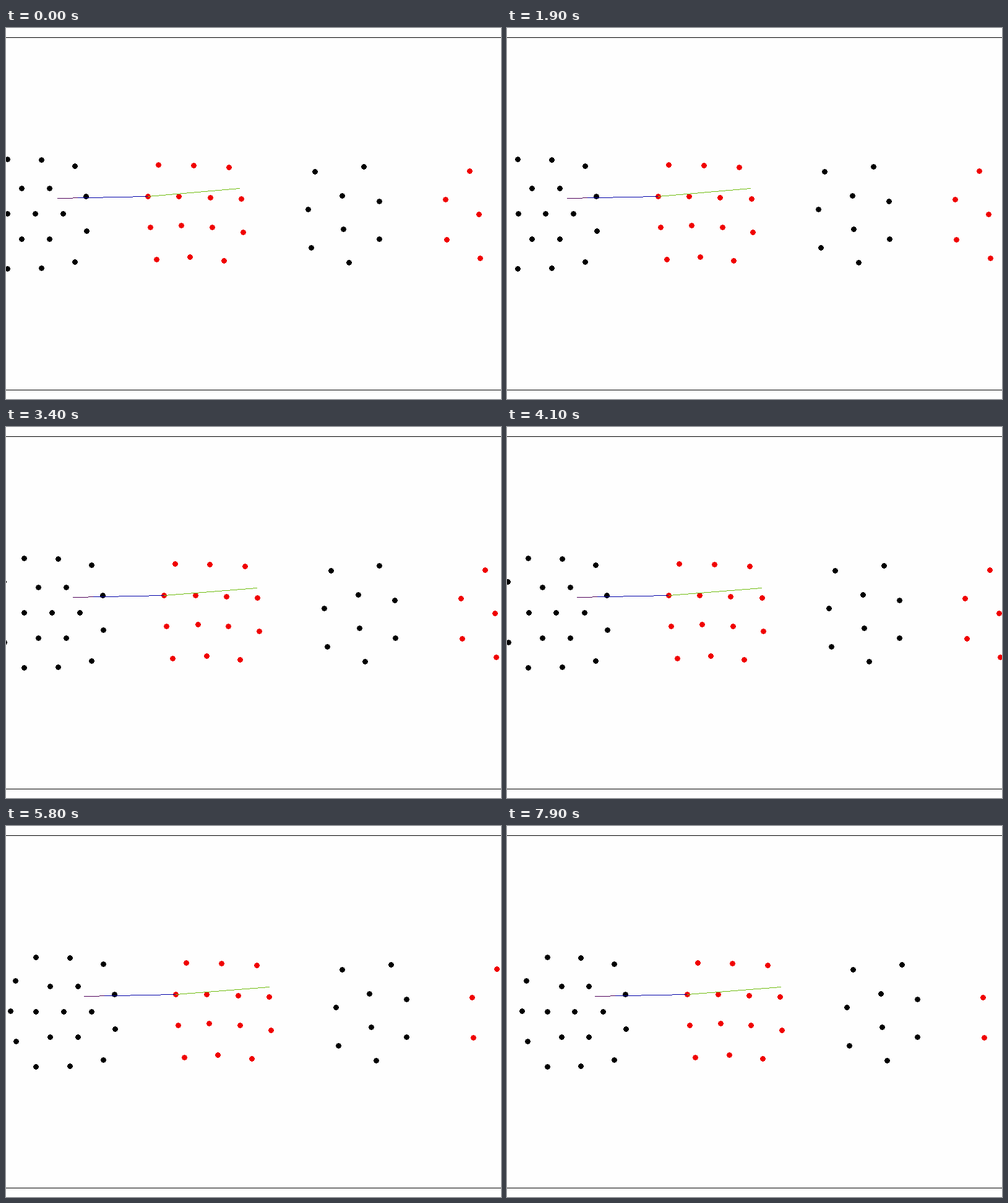
A matplotlib script that plays this animation: 800x600 px, repeating every 8000 ms.

```python
import numpy as np
import matplotlib.pyplot as plt
from matplotlib.animation import FuncAnimation
from matplotlib.collections import PolyCollection

W, H, DPI = 800, 600, 100
FRAMES, STEP_MS = 80, 100
AXIS_Y = 300.8
PURPLE_LEN = 33


def arc(a, b, n, bow=0):
    """n points spread from a to b, bent sideways by bow pixels."""
    a, b = np.array(a), np.array(b)
    s = np.linspace(0, 1, n)[:, None]
    side = np.array([a[1] - b[1], b[0] - a[0]]) / np.hypot(*(b - a))
    return a + (b - a) * s + side * bow * 4 * s * (1 - s)


def ring(cx, cy, rx, ry, n):
    q = 2 * np.pi * np.arange(n) / n
    return np.column_stack([cx + rx * np.cos(q), cy + ry * np.sin(q)])


def mirror(points):
    return points * [1, -1] + [0, 2 * AXIS_Y]


top = arc((2.3, 212.5), (111.5, 223.5), 3, -4.5)
black = np.vstack([
    # Round cluster: centre, hexagon and outer rim
    [(47.3, AXIS_Y)],
    ring(47.9, AXIS_Y, 45, 47.3, 6),
    top, mirror(top),
    arc((-31, 250.5), (-29.8, 348.5), 3, 8.3),
    arc((129.6, 272.5), (130.6, 328.2), 2),
    # Loose cluster of three bent columns
    arc((499.2, 232.5), (493.4, 355.5), 3, 7.4),
    arc((543.7, 271.3), (554.2, 379.5), 3, 3),
    arc((578.1, 224.5), (603.7, 341.7), 3, -12.5),
])
grid = arc((229.4, 272.5), (380.4, 276.6), 4, -1)
red = np.vstack([
    # Square cluster of four rows
    arc((246.5, 221.5), (360.4, 225.5), 3, -1),
    grid,
    arc((233.4, 322.5), (383.2, 330), 4, -6),
    arc((243.2, 374.5), (352.2, 376.8), 3, -5),
    # Cluster at the right edge
    arc((710, 277.2), (712.2, 342.7), 2),
    arc((749.4, 231.4), (766.9, 372.6), 3, -6.6),
])


def drift(points, t):
    """Flow to the right, slightly slower further along."""
    x, y = points.T
    return np.floor(np.column_stack([x + (62.8 - x / 220) * t, y]))


def dot_outline(r=4):
    """Stepped outline of a disc built from whole pixels."""
    k = np.arange(-r, r + 1)
    half = np.floor(np.sqrt(r * r + 2 - k * k))
    edge = np.column_stack([k, k + 1]).ravel()
    half = np.repeat(half, 2)
    right = np.column_stack([half + 1, edge])
    left = np.column_stack([-half, edge])
    return np.vstack([right, left[::-1]])


DOT = dot_outline()
PIXEL = np.array([(0, 0), (1, 0), (1, 1), (0, 1)])


def pixel_line(a, b):
    x = np.arange(a[0], b[0] + 1)
    y = np.rint(np.interp(x, [a[0], b[0]], [a[1], b[1]]))
    return PIXEL + np.column_stack([x, y])[:, None]


fig = plt.figure(figsize=(W / DPI, H / DPI), dpi=DPI, facecolor="#fefefe")
ax = fig.add_axes([0, 0, 1, 1])
ax.set_xlim(0, W)
ax.set_ylim(H, 0)
ax.axis("off")


def layer(color, z, verts=()):
    return ax.add_collection(PolyCollection(
        verts, facecolors=color, linewidths=0, snap=False, zorder=z),
        autolim=False)


layer("black", 1, [PIXEL * [W, 1] + [0, y] for y in (15, 585)])
clouds = [(layer("black", 2), black), (layer("#f00000", 2), red)]
blue = layer("#0000a8", 3)
purple = layer("#50005a", 4)
green = layer("#70bc10", 3)


def update(i):
    t = i / (FRAMES - 1)
    for cloud, points in clouds:
        cloud.set_verts([DOT + p for p in drift(points, t)])
    tail = np.floor([83.5 + 58.5 * t, 275])
    node = drift(grid[:1], t)[0]
    tip = np.floor([377.4 + 65.2 * t, 259.7 + 0.9 * t])
    line = pixel_line(tail, node)
    blue.set_verts(line)
    purple.set_verts(line[:PURPLE_LEN])
    green.set_verts(pixel_line(node, tip))
    return []


anim = FuncAnimation(fig, update, frames=FRAMES, interval=STEP_MS,
                     repeat=True, repeat_delay=0, blit=False)
plt.show()
```
